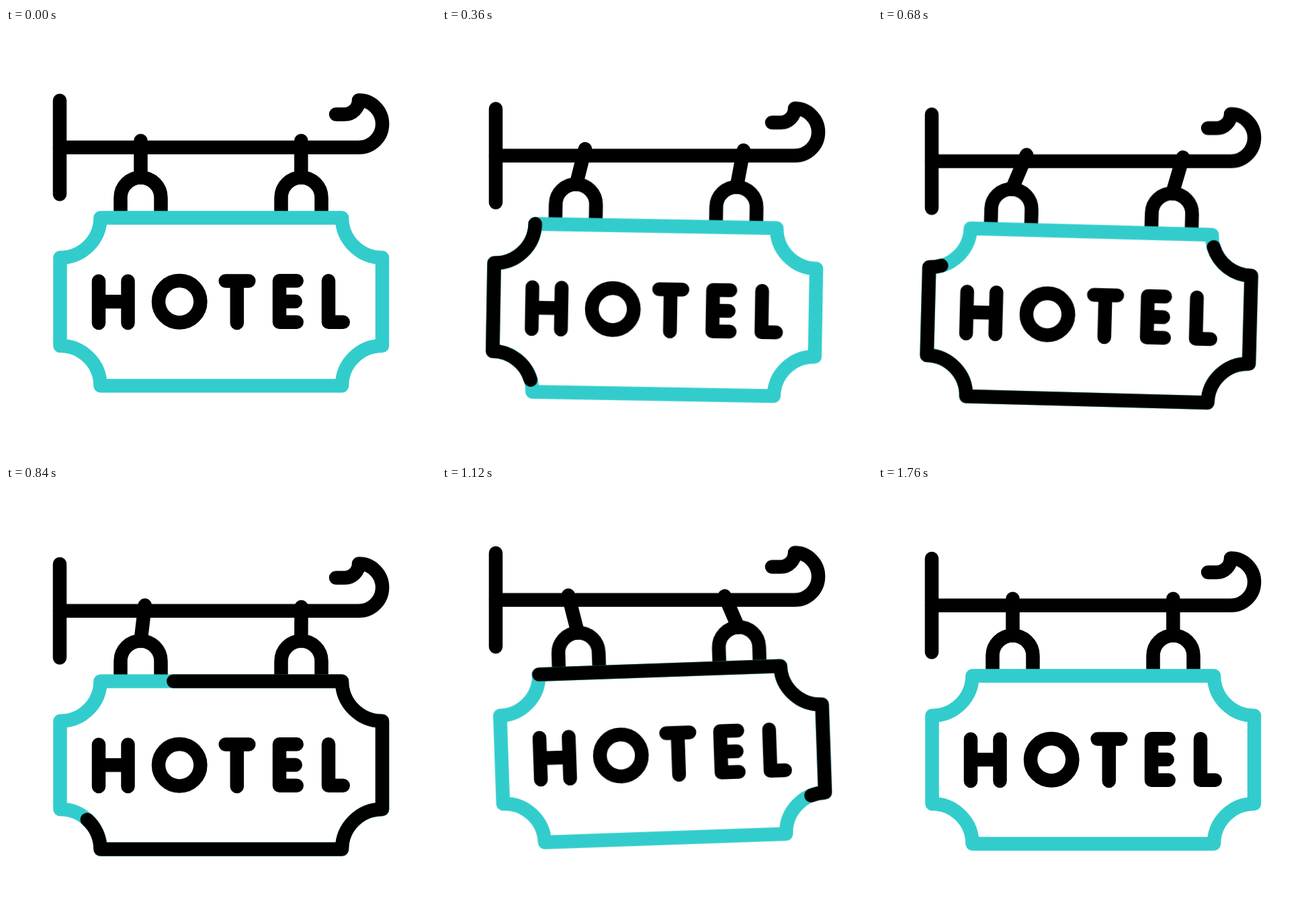
These frames come from a looping animation (640 by 640 pixels, 2 s). An HTML page:

```html
<!DOCTYPE html>
<html lang="en">
<head>
<meta charset="utf-8">
<title>Swinging hotel sign</title>
<style>
  html, body { margin: 0; width: 100%; height: 100%; overflow: hidden; background: #fff; }
  svg { display: block; width: 100vw; height: 100vh; }
  .ink, #board, #trim { fill: none; stroke: #000; stroke-width: 20.5; stroke-linecap: round; stroke-linejoin: round; }
  #board { stroke: #33cccc; }
  #sign { transform-origin: 320px 178px; }
</style>
</head>
<body>
<svg viewBox="0 0 640 640" role="img" aria-label="Hotel">
  <g id="bracket" class="ink">
    <path d="M80 108V247.5"/>
    <path d="M80 177.8H525A35.1 35.1 0 0 0 525 107.6A21 21 0 0 1 504 128.5H491"/>
  </g>
  <path id="rodL" class="ink"/>
  <path id="rodR" class="ink"/>
  <g id="sign">
    <g class="ink" style="stroke-linecap: butt">
      <path d="M170.5 280V252.5a30 30 0 0 1 60 0V280"/>
      <path d="M409.5 280V252.5a30 30 0 0 1 60 0V280"/>
    </g>
    <path id="board"/>
    <path id="trim" pathLength="100"/>
    <g class="ink">
      <path d="M138 376.7V439M181.5 376.7V439M138 407.2H181.5"/>
      <circle cx="258.2" cy="407.2" r="31.2"/>
      <path d="M326.7 376.6H361.3M343.8 376.6V439"/>
      <path d="M432.7 376.2H407V437.8H432.7M407 407H430.7"/>
      <path d="M480 376.2V437.8H501.7"/>
    </g>
  </g>
</svg>
<script>
const LOOP = 2000, STEP = 40, LEAD = 80, LAST = 42;
const $ = id => document.getElementById(id);

const outline = 'M140.5 282.5A59.7 59.7 0 0 1 80.5 341.8V473A59.7 59.7 0 0 1 140.5 532.5' +
  'H500A59.7 59.7 0 0 1 560 473V341.8A59.7 59.7 0 0 1 500 282.5H140.5';
$('board').setAttribute('d', outline);
$('trim').setAttribute('d', outline);

// Eased progress from step a to step b.
const ease = (n, a, b) => {
  const u = Math.min(1, Math.max(0, (n - a) / (b - a)));
  return u * u * (3 - 2 * u);
};

// Rest, then the low pose, then the high pose, then rest again.
const swing = (n, low, high) =>
  low * ease(n, 2, 12) + (high - low) * ease(n, 12, 26) - high * ease(n, 26, 42);

const drop = n => swing(n, 24.4, -8.2);
const tilt = n => swing(n, 2, -2);

// A point fixed to the sign, after the sign has moved.
function onSign(x, y, n) {
  const a = tilt(n) * Math.PI / 180, c = Math.cos(a), s = Math.sin(a);
  const dx = x - 320, dy = y - 178;
  return [320 + dx * c - dy * s, 178 + dx * s + dy * c + drop(n)];
}

function rod(x, low, high) {
  return n => {
    const top = [x + swing(n, low[0], high[0]), 167.8 + swing(n, low[1], high[1])];
    const [bx, by] = onSign(x, 222.5, n);
    return { d: `path("M ${top[0].toFixed(2)} ${top[1].toFixed(2)} L ${bx.toFixed(2)} ${by.toFixed(2)}")` };
  };
}

function trim(n) {
  const head = 100 * ease(n, 0, 23), tail = 100 * ease(n, 11, 39);
  const len = head - tail;
  return {
    strokeDasharray: `${len.toFixed(3)} 200`,
    strokeDashoffset: (-tail).toFixed(3),
    opacity: len > 0.01 ? 1 : 0
  };
}

// Each pose holds until the next step.
function play(id, pose) {
  const frames = [];
  for (let n = 0; n <= LAST; n++) {
    const offset = n ? (LEAD + STEP * n) / LOOP : 0;
    frames.push({ ...pose(n), offset, easing: 'step-end' });
  }
  frames.push({ ...pose(LAST), offset: 1 });
  $(id).animate(frames, { duration: LOOP, iterations: Infinity });
}

play('bracket', n => ({ transform: `translateY(${drop(n).toFixed(2)}px)` }));
play('sign', n => ({ transform: `translateY(${drop(n).toFixed(2)}px) rotate(${tilt(n).toFixed(3)}deg)` }));
play('rodL', rod(200.5, [25, 24.4], [-12.5, -5]));
play('rodR', rod(439.3, [19, 28.5], [-18.5, -4]));
play('trim', trim);
</script>
</body>
</html>
```
